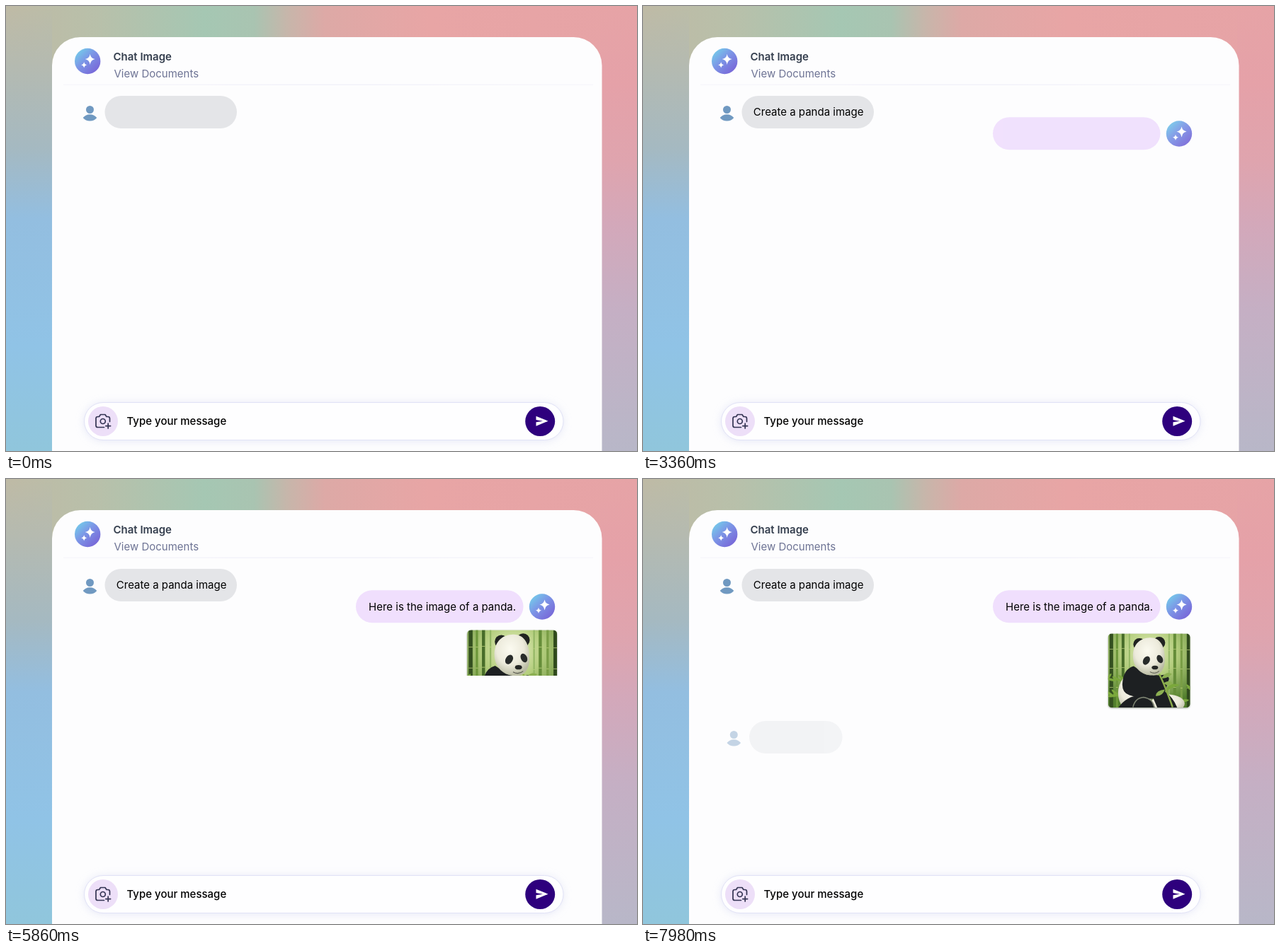
An HTML page for the animation above (8 s loop, 891 by 629 pixels).

```html
<!DOCTYPE html>
<html lang="en">
<head>
<meta charset="utf-8">
<title>Chat</title>
<style>
  html, body { margin: 0; width: 100%; height: 100%; overflow: hidden; }
  body {
    background:
      linear-gradient(#b5bab000 0, #b5bab0 80px, #a5b9c1 200px, #93bee0 300px, #90c3e6 480px, #90c6dc) 0 0 / 65px 100% no-repeat,
      linear-gradient(#e5a0a800 0, #e5a1a8 110px, #dfa4ae 220px, #d3a8ba 310px, #c5afc4 430px, #b8b7c8) 100% 0 / 52px 100% no-repeat,
      linear-gradient(90deg, #bfbaa5, #b8c0aa 130px, #a5c7b3 280px, #a9c4b1 350px, #c8b5aa 400px, #dda9a6 450px, #e8a5a5 600px, #e6a3a6);
  }
  svg { display: block; width: 100vw; height: 100vh; }
  text { font: 15px Inter, sans-serif; white-space: pre; }
</style>
</head>
<body>
<svg viewBox="0 0 891 629">
  <defs>
    <linearGradient id="blue" x1=".1" y1=".1" x2=".85" y2=".9">
      <stop stop-color="#74cbea"/><stop offset=".45" stop-color="#7c95e6"/><stop offset="1" stop-color="#7867d8"/>
    </linearGradient>
    <linearGradient id="rule">
      <stop stop-color="#f5f4fa"/><stop offset=".5" stop-color="#ececf7"/><stop offset="1" stop-color="#f5f4fa"/>
    </linearGradient>
    <radialGradient id="forest" cx=".5" cy=".25" r=".75">
      <stop stop-color="#e6efc0"/><stop offset=".45" stop-color="#b3cd7c"/><stop offset="1" stop-color="#517d2c"/>
    </radialGradient>
    <radialGradient id="fur" cx=".45" cy=".35" r=".65">
      <stop stop-color="#fbfaf0"/><stop offset=".6" stop-color="#eceadb"/><stop offset="1" stop-color="#b9bba2"/>
    </radialGradient>
    <filter id="glow" x="-5%" y="-50%" width="110%" height="200%"><feGaussianBlur stdDeviation="6"/></filter>
    <filter id="soft" x="-10%" y="-10%" width="120%" height="120%"><feGaussianBlur stdDeviation="1.2"/></filter>
    <clipPath id="frame"><rect width="115.5" height="104.5" rx="5"/></clipPath>
    <clipPath id="wipe"><rect id="wipeBox" x="-4" y="-4" width="124"/></clipPath>

    <g id="bot">
      <circle r="18.2" fill="url(#blue)"/>
      <path id="star" fill="#fff" d="M3.5-10Q4.5-4 10.500-3Q4.500-2 3.500 5Q2.500-2-3.500-3Q2.500-4 3.500-10Z"/>
      <path fill="#fff" d="M-5 1Q-4.300 4.700-.8 5.300Q-4.300 6-5 9.500Q-5.700 6-9.200 5.300Q-5.700 4.700-5 1Z"/>
    </g>
    <g id="person" fill="#7099c1">
      <circle cy="-5" r="5.500"/>
      <path d="M-9.800 6.500Q-6 1.800 0 1.800T9.800 6.500Q6 11 0 11T-9.800 6.500Z"/>
    </g>
  </defs>

  <path fill="#fdfdfe" d="M65 629V84a40 40 0 0 1 40-40H801.500a40 40 0 0 1 40 40V629Z"/>
  <use href="#bot" x="115.200" y="78"/>
  <text x="151.500" y="77" font-weight="600" style="font-weight:600" fill="#333d4d">Chat Image</text>
  <text x="152.500" y="101" fill="#6d7394">View Documents</text>
  <rect x="81" y="110.700" width="748" height="1" fill="url(#rule)"/>

  <use href="#person" x="118.500" y="151.500"/>
  <rect x="139.500" y="127" width="186.500" height="46" rx="23" fill="#e4e5e8"/>
  <text id="request" x="155.800" y="155.300"></text>

  <g id="reply">
    <rect x="494" y="157.300" width="236.500" height="46" rx="23" fill="#f0dffd"/>
    <use href="#bot" x="757" y="180.500"/>
  </g>
  <text id="answer" x="512" y="185.800"></text>

  <g id="picture">
    <g clip-path="url(#wipe)">
      <rect y="1" width="115.500" height="104.500" rx="5" fill="#5a6650" opacity=".6" filter="url(#soft)"/>
      <g clip-path="url(#frame)">
        <rect width="116" height="105" fill="url(#forest)"/>
        <g id="bamboo"></g>
        <g id="leaves" fill="#7ba83c"></g>
        <ellipse cx="38" cy="84" rx="24" ry="29" fill="url(#fur)"/>
        <ellipse cx="84" cy="99" rx="24" ry="13" fill="url(#fur)"/>
        <path fill="#1d2022" d="M36 46Q21 50 20 72Q20 84 30 87Q48 93 64 92L70 106H98Q92 90 80 82L86 64Q84 56 74 59L54 58Z"/>
        <path fill="#1d2022" d="M14 105Q28 85 50 88Q64 94 66 105Z"/>
        <path fill="none" stroke="#7e8573" stroke-width="1.500" d="M35 104Q38 91 50 90Q63 92 65 104"/>
        <circle cx="44" cy="15" r="8.500" fill="#202321"/>
        <circle cx="72" cy="13" r="8.500" fill="#202321"/>
        <path fill="url(#fur)" d="M57 6C73 4 80 18 80 34C81 51 73 60 62 59C46 59 35 47 35 32C35 17 43 7 57 6Z"/>
        <ellipse cx="54" cy="38" rx="4.500" ry="6.500" fill="#282b2a" transform="rotate(30 54 38)"/>
        <ellipse cx="73" cy="36" rx="4" ry="6" fill="#282b2a" transform="rotate(-25 73 36)"/>
        <ellipse cx="66" cy="48" rx="4.500" ry="2.800" fill="#242624"/>
        <path fill="none" stroke="#55564c" d="M59 54Q66 58 72 53"/>
        <path fill="none" stroke="#8cad4b" stroke-width="2.500" d="M72 57Q80 73 91 104"/>
        <path fill="#8cb052" d="M75 63Q82 52 90 57Q84 64 75 63ZM78 70Q88 64 91 71Q85 76 78 70ZM80 79Q68 80 67 88Q77 89 80 79Z"/>
      </g>
    </g>
  </g>

  <g id="followUp">
    <use href="#person" x="128.300" y="366.500"/>
    <rect x="150" y="342" width="131.500" height="46" rx="23" fill="#e4e5e8"/>
  </g>

  <rect x="110" y="561" width="677" height="54" rx="27" fill="#cfd2ef" opacity=".5" filter="url(#glow)"/>
  <rect x="110.500" y="560.500" width="676.500" height="53" rx="26.500" fill="#fefeff" stroke="#e1e2f6"/>
  <circle cx="137" cy="587" r="21" fill="#eddff8"/>
  <g fill="none" stroke="#333352" stroke-width="1.700" stroke-linecap="round" stroke-linejoin="round">
    <path d="M138.500 595.500H129.500Q127 595.500 127 593V583Q127 580.500 129.500 580.500H131.500L133.500 577.500H140L142 580.500H144Q146.500 580.500 146.500 583V587.500M144.200 590.200V597M140.800 593.600H147.600"/>
    <circle cx="136.800" cy="587" r="3.500"/>
  </g>
  <text x="170.500" y="592.300" style="font-weight:500">Type your message</text>
  <circle cx="754.200" cy="587" r="21" fill="#2e007d"/>
  <path fill="#fff" d="M748.500 579.700L765.500 586.700L748.500 593.700V588.300L758 586.700L748.500 585.100Z"/>
</svg>
<script>
const LOOP = 8000;
const $ = id => document.getElementById(id);
const clamp = v => Math.min(1, Math.max(0, v));
const progress = (t, start, length) => clamp((t - start) / length);
const easeSine = u => .5 - .5 * Math.cos(Math.PI * u);

const requestText = 'Create a panda image';
const keyTimes = [60, 160, 260, 360, 460, 560, 690, 820, 910, 1000, 1120,
                  1260, 1380, 1520, 1600, 1680, 1820, 1920, 2020, 2120];
const answerWords = 'Here is the image of a panda.'.split(' ');

// Forest behind the panda: [x, width, colour]
const stalks = [[2, 5, '#334f1f'], [11, 3, '#6d973b'], [19, 4, '#476c29'], [29, 2, '#94b765'],
                [85, 2, '#94b765'], [92, 4, '#658d39'], [102, 3, '#799d45'], [111, 5, '#304a1d']];
$('bamboo').innerHTML = stalks.map(([x, w, color]) =>
  `<rect x="${x}" width="${w}" height="105" fill="${color}"/>
   <path d="M${x} ${20 + x % 9}h${w}m${-w} 27h${w}m${-w} 27h${w}" stroke="#c2d57e" stroke-width=".7"/>`).join('');
$('leaves').innerHTML = Array.from({ length: 20 }, (_, i) => {
  const x = i % 2 ? 86 + i * 7 % 30 : i * 5 % 28;
  const y = 62 + i * 11 % 43;
  return `<ellipse cx="${x}" cy="${y}" rx="7" ry="1.800" transform="rotate(${i * 47 % 100 - 50} ${x} ${y})"/>`;
}).join('');

function draw(t) {
  $('request').textContent = requestText.slice(0, keyTimes.filter(k => k <= t).length);

  $('reply').setAttribute('opacity', progress(t, 2640, 780));
  const words = Math.max(0, Math.floor((t - 3620) / 140) + 1);
  $('answer').textContent = answerWords.slice(0, words).join(' ');

  const shown = easeSine(progress(t, 4890, 1800));
  const scale = 1 + .19 * (1 - shown) ** .8;
  $('picture').setAttribute('transform',
    `translate(714.6 270.800) scale(${scale}) translate(-57.750 -52.250)`);
  $('wipeBox').setAttribute('height', shown && 4 + 104.5 * shown + 4 * progress(shown, .96, .04));
  $('picture').setAttribute('visibility', shown ? 'visible' : 'hidden');

  $('followUp').setAttribute('opacity', progress(t, 7100, 2200));
}

function tick() {
  draw(performance.now() % LOOP);
  requestAnimationFrame(tick);
}
tick();
</script>
</body>
</html>
```
